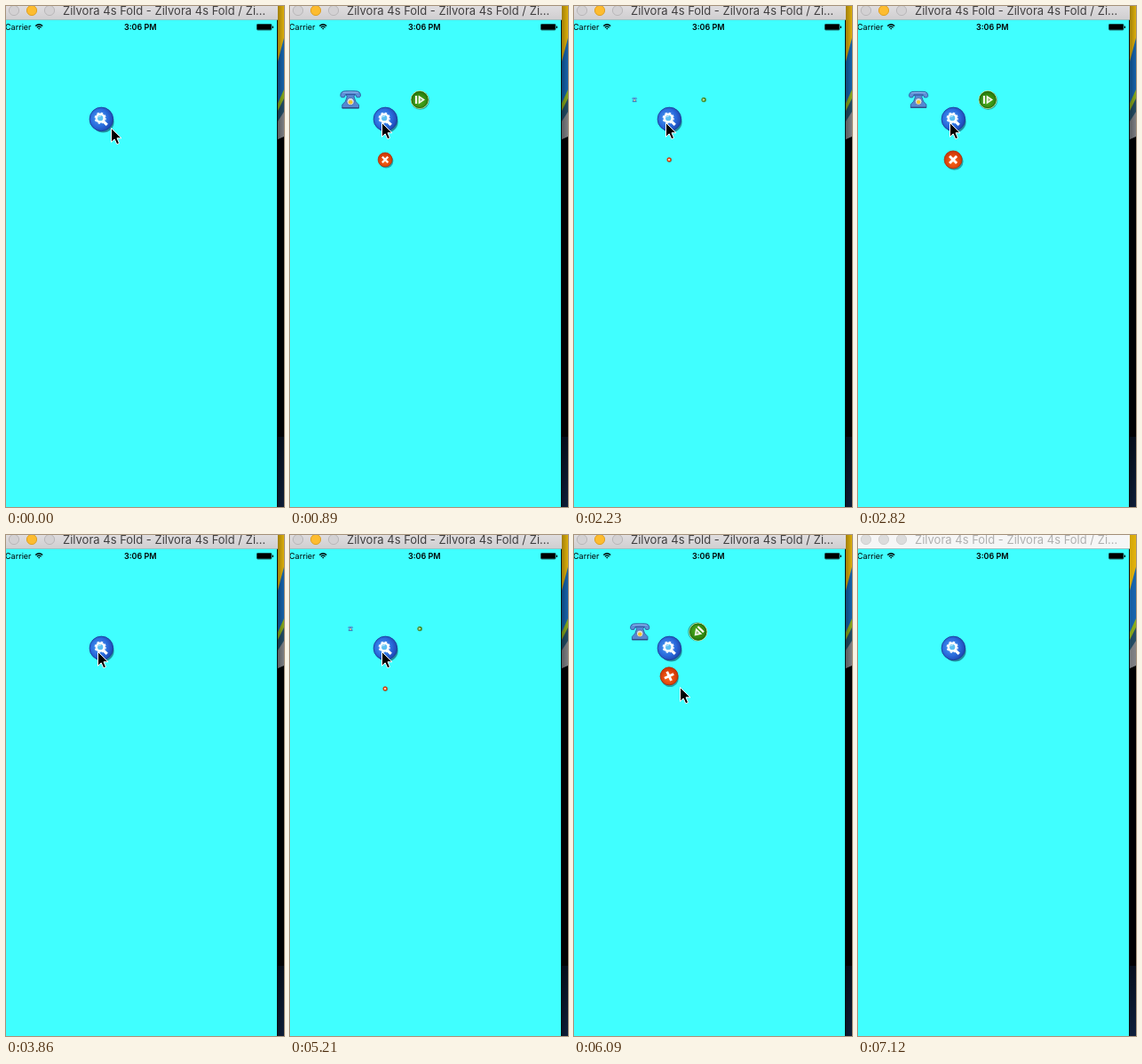
An HTML page for the animation above (7.16 s loop, 313 px wide and 564 px high).

```html
<!DOCTYPE html>
<html lang="en">
<head>
<meta charset="utf-8">
<title>Pop-out menu</title>
<style>
  html, body { margin: 0; width: 100%; height: 100%; overflow: hidden; background: #000; }
  svg { display: block; width: 313px; height: 564px; }
  text { font-family: Inter, "Liberation Sans", sans-serif; }
  .bar { fill: url(#barFill); }
  .title { font-size: 13px; fill: #403f40; }
  .light { fill: #d3d1d3; stroke: #b9b7b9; }
  .light.mid { fill: #fdbc2f; stroke: #dfa023; }
  .idle .bar { fill: #f6f6f6; }
  .idle .title { fill: #b0b0b0; }
  .idle .light { fill: #dcdcdc; stroke: #d0d0d0; }
  .idle .shade { opacity: .35; }
</style>
</head>
<body>
<svg id="stage" viewBox="0 0 313 564">
  <defs>
    <linearGradient id="barFill" x2="0" y2="1">
      <stop stop-color="#dfdddf"/><stop offset="1" stop-color="#d0ced0"/>
    </linearGradient>
    <linearGradient id="edge">
      <stop stop-color="#000" stop-opacity=".38"/><stop offset="1" stop-color="#000" stop-opacity=".06"/>
    </linearGradient>
    <linearGradient id="night" x2="0" y2="1">
      <stop stop-color="#07101f"/><stop offset="1" stop-color="#10213f"/>
    </linearGradient>
    <radialGradient id="blue" cx=".4" cy=".45" r=".62">
      <stop stop-color="#4aa0f4"/><stop offset=".6" stop-color="#2a6bdc"/><stop offset="1" stop-color="#1e45ae"/>
    </radialGradient>
    <radialGradient id="green" cx=".5" cy=".6" r=".6">
      <stop stop-color="#4fb020"/><stop offset="1" stop-color="#237409"/>
    </radialGradient>
    <radialGradient id="red" cx=".5" cy=".6" r=".6">
      <stop stop-color="#ff6a1c"/><stop offset="1" stop-color="#c93004"/>
    </radialGradient>
  </defs>

  <!-- desktop strip -->
  <g>
    <rect x="304" width="9" height="564" fill="#020203"/>
    <rect x="304" width="9" height="90" fill="#e9b80c"/>
    <path d="M313 36L304 70V118L313 98Z" fill="#1768b4"/>
    <path d="M313 94L304 114V130L313 112Z" fill="#8fb21c"/>
    <path d="M313 104L304 122V134L313 121Z" fill="#24506a"/>
    <path d="M313 119L304 133V151L313 147Z" fill="#85868a"/>
    <rect x="304" y="485" width="9" height="79" fill="url(#night)"/>
    <rect class="shade" x="304" width="9" height="564" fill="url(#edge)"/>
  </g>

  <!-- window -->
  <rect y="15" width="305" height="549" fill="#40ffff"/>
  <rect x="305" y="4" width="1" height="560" fill="#061214"/>
  <path class="bar" d="M0 0H306V15H0Z"/>
  <rect y="15" width="306" height=".8" fill="#a9b5b5"/>
  <circle class="light" cx="9" cy="5" r="5.6"/>
  <circle class="light mid" cx="29" cy="5" r="5.6"/>
  <circle class="light" cx="49" cy="5" r="5.6"/>
  <text class="title" x="64" y="10.3">Zilvora 4s Fold - Zilvora 4s Fold / Zi...</text>

  <!-- status bar -->
  <text x="-1" y="27" font-size="9">Carrier</text>
  <g fill="none" stroke="#000" stroke-width="1.3">
    <path d="M33.2 22.6Q37.2 18.9 41.2 22.6M34.8 24.3Q37.2 22 39.6 24.3"/>
    <path d="M37.2 26.6L36 25.3Q37.2 24.4 38.4 25.3Z" fill="#000" stroke="none"/>
  </g>
  <text x="133" y="27" font-size="9" font-weight="600">3:06 PM</text>
  <rect x="282" y="20" width="17.4" height="7.4" rx="1.4" opacity=".6"/>
  <rect x="282.8" y="20.8" width="15.8" height="5.8" rx=".8"/>
  <rect x="299.8" y="22.4" width="1.2" height="2.6" rx=".5"/>

  <!-- menu items -->
  <g class="item">
    <path d="M-5 -5.5L-3.6 -3.4Q-4.6 2.4 -8.8 5.4V9H8.8V5.4Q4.6 2.4 3.6 -3.4L5 -5.5Z" fill="#5488d2" stroke="#2c4f95" stroke-width=".8"/>
    <path d="M-10.6 -4Q-11 -9.2 -5 -9.2H5Q11 -9.2 10.6 -4L9.6 -2.6H6.6L5.2 -5.6H-5.2L-6.6 -2.6H-9.6Z" fill="#5c8fd8" stroke="#2c4f95" stroke-width=".8"/>
    <path d="M-8 -7.6Q0 -8.6 8 -7.6" fill="none" stroke="#9cc0ee" stroke-width=".8"/>
    <path d="M-8.8 8.6H8.8" stroke="#2f4a80" stroke-width="1.2"/>
    <circle cy="2" r="3.9" fill="#d8dde6" stroke="#3b5fa0" stroke-width=".7"/>
    <circle cy="2.6" r="2.2" fill="#f2c62e"/>
  </g>
  <g class="item">
    <circle cx=".5" cy=".8" r="10.6" fill="#0b5a3c" opacity=".5"/>
    <circle r="10" fill="url(#green)" stroke="#cfe8a8" stroke-width=".9"/>
    <circle r="9.2" fill="none" stroke="#1d5f08" stroke-width=".7"/>
    <path d="M-5.2 -4.6H-3V4.6H-5.2ZM-1.4 -5L6 0L-1.4 5Z" fill="#f4f8ee"/>
    <path d="M.4 -1.9L3.2 0L.4 1.9Z" fill="#8fb878"/>
  </g>
  <g class="item">
    <ellipse cx="1.5" cy="2" rx="10" ry="9.8" fill="#0a5560" opacity=".55"/>
    <circle r="10" fill="url(#red)" stroke="#a83008" stroke-width=".8"/>
    <path d="M-4 -4L4 4M4 -4L-4 4" stroke="#fff" stroke-width="2.9"/>
  </g>

  <!-- main button -->
  <g transform="translate(107.4 127.4)">
    <ellipse cx="2" cy="3" rx="12.2" ry="12" fill="#0b4860" opacity=".6"/>
    <circle r="13.3" fill="url(#blue)" stroke="#1c3c98" stroke-width=".9"/>
    <path d="M2 2.2L6.4 6.4" stroke="#fff" stroke-width="3.2"/>
    <circle cx="-1.2" cy="-1.2" r="6" fill="none" stroke="#fff" stroke-width="1.2" stroke-dasharray="2.4 2.31"/>
    <circle cx="-1.2" cy="-1.2" r="4.4" fill="#5cc0f2" stroke="#fff" stroke-width="2.5"/>
    <path d="M-3.4 -2Q-2.6 -3.8 -.4 -3.6" stroke="#d4f3ff" stroke-width="1" fill="none"/>
  </g>

  <path id="cursor" d="M.5 .5V16.3L4.2 12.9L6.8 18.7L9.5 17.5L7 11.8H12Z" fill="#000" stroke="#fff" stroke-width="1"/>
</svg>

<script>
  const LOOP = 7160, STEP = 147.5, HUB = [107.1, 128];
  const bursts = [0, 150, 600, 1640, 3420, 5210, 7120];
  const cycles = [[600, 1617], [2230, 3390], [5210, 5820]]; // open, close
  const stage = document.getElementById('stage');
  const cursor = document.getElementById('cursor');
  const nodes = document.querySelectorAll('.item');

  // spin: turn in degrees on the way out and on the way in
  const items = [
    { angle: 210, openLag: 0, closeLag: 30, spin: [[0, 0], [140, -38], [245, -360], [435, -720]] },
    { angle: 330, openLag: 60, closeLag: 29, spin: [[0, 0], [140, -225], [245, -225], [435, -360]] },
    { angle: 90, openLag: 120, closeLag: 0, spin: [[0, 0], [170, -45], [275, -340], [435, -720]] }
  ];
  const grow = [[0, .25], [270, 1.1], [370, .95], [450, 1]];
  const reach = [[0, 45], [165, 57], [405, 0]];
  const cursorX = [[0, 118], [150, 109], [297, 103], [5947, 103], [6095, 119], [6242, 177], [6390, 206], [6537, 214], [6685, 216]];
  const cursorY = [[0, 137], [150, 133], [297, 131], [5947, 131], [6095, 171], [6242, 368], [6390, 475], [6537, 543], [6685, 580]];

  function track(keys, t) {
    if (t <= keys[0][0]) return keys[0][1];
    for (let i = 1; i < keys.length; i++) {
      const [t0, a] = keys[i - 1], [t1, b] = keys[i];
      if (t < t1) return a + (b - a) * (t - t0) / (t1 - t0);
    }
    return keys[keys.length - 1][1];
  }

  // The picture refreshes in even steps within each burst of movement.
  function hold(t) {
    const start = bursts.filter(b => b <= t).pop();
    return start + Math.floor((t - start + 9) / STEP) * STEP;
  }

  function place(node, item, t) {
    const cycle = cycles.filter(c => c[0] <= t).pop();
    const out = cycle ? t - cycle[1] - item.closeLag : Infinity;
    const shown = out < 405;
    node.style.display = shown ? '' : 'none';
    if (!shown) return;
    const a = item.angle * Math.PI / 180, r = track(reach, out);
    const x = HUB[0] + r * Math.cos(a), y = HUB[1] + r * Math.sin(a);
    const size = track(grow, t - cycle[0] - item.openLag);
    node.setAttribute('transform', `translate(${x} ${y}) rotate(${track(item.spin, out)}) scale(${size})`);
  }

  function draw(now) {
    const clock = now % LOOP, t = hold(clock);
    items.forEach((item, i) => place(nodes[i], item, t));
    cursor.setAttribute('transform', `translate(${track(cursorX, t)} ${track(cursorY, t)})`);
    stage.classList.toggle('idle', clock >= 7120);
  }

  let begin;
  function tick(now) {
    begin ??= now;
    draw(now - begin);
    requestAnimationFrame(tick);
  }
  draw(0);
  requestAnimationFrame(tick);
</script>
</body>
</html>
```
